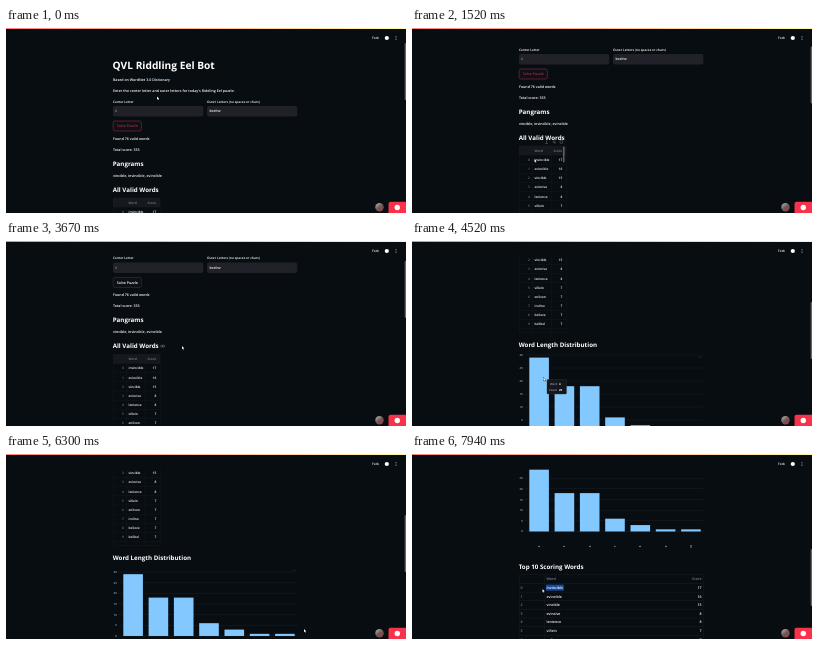
These frames come from a looping animation (400 px wide and 185 px high, 8000 ms). An HTML page with a canvas:

```html
<!DOCTYPE html>
<html lang="en">
<head>
<meta charset="utf-8">
<title>Word puzzle solver</title>
<style>
  html, body { margin: 0; width: 100%; height: 100%; overflow: hidden; background: #080d12; }
  canvas { display: block; width: 400px; height: 185px; }
</style>
</head>
<body>
<canvas id="stage"></canvas>
<script>
const W = 400, H = 185, LOOP = 8000;
const BG = '#080d12', WHITE = '#fff', GREY = '#81848b', RED = '#b5283f';
const LEFT = 107, RIGHT = 291.5;
const BODY = 3.58, SMALL = 3.24;
const canvas = document.getElementById('stage');
const ctx = canvas.getContext('2d');
const ratio = Math.max(1, window.devicePixelRatio || 1);
canvas.width = W * ratio;
canvas.height = H * ratio;

const words = [['invincible', 17], ['evincible', 16], ['vincible', 15], ['evincive', 8], ['lenience', 8],
  ['villein', 7], ['enliven', 7], ['incline', 7], ['believe', 7], ['belibel', 7]];
const counts = [29, 18, 18, 6, 3, 1, 1];

// Keyframes: [time, value, ...]
const scrollKeys = [[700, 0], [1300, 52], [3600, 52], [4240, 183], [6330, 183], [7200, 287.5]];
const zoomKeys = [[4600, 1], [5000, 1 / 1.22]];
const pointerKeys = [[0, 151, 68.5], [520, 146, 66], [1080, 146, 66], [1450, 122.5, 131], [2210, 122.5, 131],
  [2400, 148, 131], [2550, 126, 132], [2730, 126, 132], [3000, 176, 105], [3670, 176, 105], [4240, 131.5, 136.5],
  [5000, 131.5, 136.5], [5300, 152, 150], [5600, 179, 158], [5880, 229, 175], [6150, 298, 175],
  [6900, 298, 175], [7480, 130.5, 135]];

function sample(keys, t) {
  const next = keys.findIndex(k => k[0] > t);
  if (next === 0) return keys[0].slice(1);
  if (next < 0) return keys[keys.length - 1].slice(1);
  const a = keys[next - 1], b = keys[next];
  const p = (t - a[0]) / (b[0] - a[0]), e = p * p * (3 - 2 * p);
  return a.slice(1).map((v, i) => v + (b[i + 1] - v) * e);
}

function text(str, x, y, size = BODY, color = WHITE, align = 'left', weight = 600) {
  ctx.font = `${weight} ${size}px "Open Sans", "Noto Sans", sans-serif`;
  ctx.textAlign = align;
  ctx.fillStyle = color;
  ctx.fillText(str, x, y + size * 0.36);
}

function rect(x, y, w, h, fill) {
  ctx.fillStyle = fill;
  ctx.fillRect(x, y, w, h);
}

function box(x, y, w, h, r, fill, stroke, line = 0.4) {
  ctx.beginPath();
  ctx.roundRect(x, y, w, h, r);
  if (fill) { ctx.fillStyle = fill; ctx.fill(); }
  if (stroke) { ctx.strokeStyle = stroke; ctx.lineWidth = line; ctx.stroke(); }
}

function dot(x, y, r, fill) {
  ctx.beginPath();
  ctx.arc(x, y, r, 0, Math.PI * 2);
  ctx.fillStyle = fill;
  ctx.fill();
}

function heading(str, y, mouse) {
  text(str, LEFT - 0.3, y, 6.2, WHITE, 'left', 700);
  const end = LEFT + ctx.measureText(str).width;
  if (Math.abs(mouse.y - y) < 4.5 && mouse.x > LEFT && mouse.x < RIGHT) {
    box(end + 1.6, y - 0.7, 2.5, 1.8, 0.9, null, GREY, 0.5);
    box(end + 3.4, y - 0.7, 2.5, 1.8, 0.9, null, GREY, 0.5);
  }
}

function form(focused) {
  text('QVL Riddling Eel Bot', LEFT - 0.4, 37.6, 10.2, WHITE, 'left', 700);
  text('Based on WordNet 3.0 Dictionary', LEFT, 52.2);
  text("Enter the center letter and outer letters for today's Riddling Eel puzzle:", LEFT, 63.1);
  [[LEFT, 'Center Letter', 'i'], [201, 'Outer Letters (no spaces or chars)', 'bcelnv']].forEach(([x, label, value]) => {
    text(label, x, 73.4, SMALL);
    box(x, 78, 90.3, 10.4, 1.8, '#212229');
    text(value, x + 2.5, 83.2);
  });
  box(LEFT + 0.2, 93, 28.2, 10, 1.8, '#0d1017', focused ? RED : '#3b3e45', 0.5);
  text('Solve Puzzle', LEFT + 14.3, 98, BODY, focused ? RED : WHITE, 'center');
  text('Found 76 valid words', LEFT, 110.4);
  text('Total score: 333', LEFT, 121.3);
  text('vincible, invincible, evincible', LEFT, 147.4);
}

function wordGrid(mouse) {
  const top = 169.8, row = 9.14, width = 47, bottom = 274.5, line = '#1a1e25';
  const hovered = mouse.x > LEFT && mouse.x < LEFT + width && mouse.y > top && mouse.y < bottom;
  rect(LEFT, top, width, row, '#15181f');
  for (let i = 0; i <= 11; i++) rect(LEFT, top + i * row, width, 0.3, line);
  [0, 13, 32.5, width].forEach(x => rect(LEFT + x, top, 0.3, bottom - top, line));
  rect(LEFT, bottom, width, 0.3, line);
  text('Word', 122.5, top + row / 2, SMALL, GREY);
  text('Score', 150, top + row / 2, SMALL, GREY, 'right');
  words.forEach(([word, score], i) => {
    const y = 183.8 + i * row;
    text(i, 117, y, SMALL, '#74777e', 'center');
    text(word, 122.5, y, SMALL);
    text(score, 150.3, y, SMALL, WHITE, 'right');
  });
  if (!hovered) return;
  rect(151.2, top + 1, 1.2, 15.5, '#74777d');
  rect(134.3, 164.6, 0.5, 2.2, GREY);
  rect(133.4, 167.2, 2.3, 0.5, GREY);
  box(141, 164.8, 1.9, 1.9, 1, null, GREY);
  rect(142.6, 166.5, 0.9, 0.9, GREY);
  box(148, 164.7, 2.6, 2.6, 0.3, null, GREY);
}

function chart(zoom, mouse) {
  const base = 375, focus = 319.4, barWidth = 19.6;
  const yOf = v => focus + (base - v * 2.6 - focus) * zoom;
  const xOf = i => 127.1 + i * 25.3;
  for (let v = 0; v <= 30; v += 5) {
    rect(113, yOf(v) - 0.2, RIGHT - 113, 0.4, '#20242b');
    text(v, 110.8, yOf(v), 2.8, '#b0b3b9', 'right');
  }
  let active = -1;
  counts.forEach((n, i) => {
    const x = xOf(i) - barWidth / 2, y = yOf(n);
    rect(x, y, barWidth, yOf(0) - y, '#83c9ff');
    if (mouse.x > x && mouse.x < x + barWidth && mouse.y > y && mouse.y < yOf(0)) active = i;
    ctx.save();
    ctx.translate(xOf(i), 380);
    ctx.rotate(-Math.PI / 2);
    text(i + 4, 0, 0, 2.8, '#c4c6cb', 'center');
    ctx.restore();
  });
  for (let i = -1; i <= 1; i++) dot(288 + i * 1.4, 299, 0.35, GREY);
  return active;
}

function tooltip(bar, mouse) {
  const x = mouse.x + 3.5, y = mouse.y + 2;
  box(x, y, 19.5, 14.5, 1, '#14171e', '#30343b');
  [['Word', bar + 4], ['Count', counts[bar]]].forEach(([label, value], i) => {
    text(label, x + 10.2, y + 4.4 + i * 5.7, 2.8, '#a5a8ae', 'right');
    text(value, x + 12, y + 4.4 + i * 5.7, 2.8, WHITE, 'left', 700);
  });
}

function topTable(selected) {
  const top = 408.2, row = 8.62, line = '#20242b';
  for (let i = 0; i <= 11; i++) rect(LEFT, top + i * row, RIGHT - LEFT, 0.35, line);
  [LEFT, 132.3, RIGHT].forEach(x => rect(x, top, 0.3, row * 11, line));
  text('Word', 134.5, top + row / 2, BODY, GREY);
  text('Score', 289.5, top + row / 2, BODY, GREY, 'right');
  words.forEach(([word, score], i) => {
    const y = top + (i + 1.5) * row;
    if (i === 0 && selected) rect(134, y - 3, 17.8, 6, '#1549a0');
    text(i, 108.6, y, BODY, GREY);
    text(word, 134.5, y);
    text(score, 289.5, y, BODY, WHITE, 'right');
  });
}

function chrome(scroll) {
  rect(0, 0, W, 15, BG);
  const strip = ctx.createLinearGradient(0, 0, W, 0);
  strip.addColorStop(0, '#ff8585');
  strip.addColorStop(1, '#fff7a0');
  rect(0, 0, W, 1, strip);
  text('Fork', 366, 10, SMALL);
  dot(380.8, 10, 2.1, WHITE);
  for (let i = -1; i <= 1; i++) dot(390, 10 + i * 1.5, 0.45, WHITE);
  box(398.7, Math.max(15, 1.5 + scroll * 0.325), 1.3, 57, 0.6, '#63666c');

  const portrait = ctx.createLinearGradient(370, 175, 377, 184);
  portrait.addColorStop(0, '#b9b4b2');
  portrait.addColorStop(0.5, '#6d5553');
  portrait.addColorStop(1, '#a33a48');
  dot(373.5, 179.3, 4.2, portrait);
  box(382.5, 173.8, 18, 12, [2, 0, 0, 0], '#f6334b');
  dot(391.3, 179.5, 2.7, '#fff');
}

function pointer(x, y) {
  const outline = [[0, 0], [0, 3.2], [0.7, 2.6], [1.2, 3.7], [1.7, 3.5], [1.3, 2.4], [2.2, 2.3]];
  ctx.beginPath();
  outline.forEach(([dx, dy]) => ctx.lineTo(x + dx, y + dy));
  ctx.closePath();
  ctx.lineWidth = 0.6;
  ctx.strokeStyle = '#000';
  ctx.stroke();
  ctx.fillStyle = '#fff';
  ctx.fill();
}

function draw(t) {
  const [scroll] = sample(scrollKeys, t), [zoom] = sample(zoomKeys, t);
  const [px, py] = sample(pointerKeys, t);
  const mouse = { x: px, y: py + scroll };

  ctx.setTransform(ratio, 0, 0, ratio, 0, 0);
  ctx.textRendering = 'geometricPrecision';
  rect(0, 0, W, H, BG);
  ctx.save();
  ctx.translate(0, -scroll);
  form(t < 1900);
  heading('Pangrams', 135.5, mouse);
  heading('All Valid Words', 161.4, mouse);
  wordGrid(mouse);
  heading('Word Length Distribution', 287.2, mouse);
  const bar = chart(zoom, mouse);
  heading('Top 10 Scoring Words', 399.9, mouse);
  topTable(t > 7700);
  if (bar >= 0) tooltip(bar, mouse);
  ctx.restore();
  chrome(scroll);
  pointer(px, py);
}

function tick() {
  draw(performance.now() % LOOP);
  requestAnimationFrame(tick);
}
tick();
</script>
</body>
</html>
```
